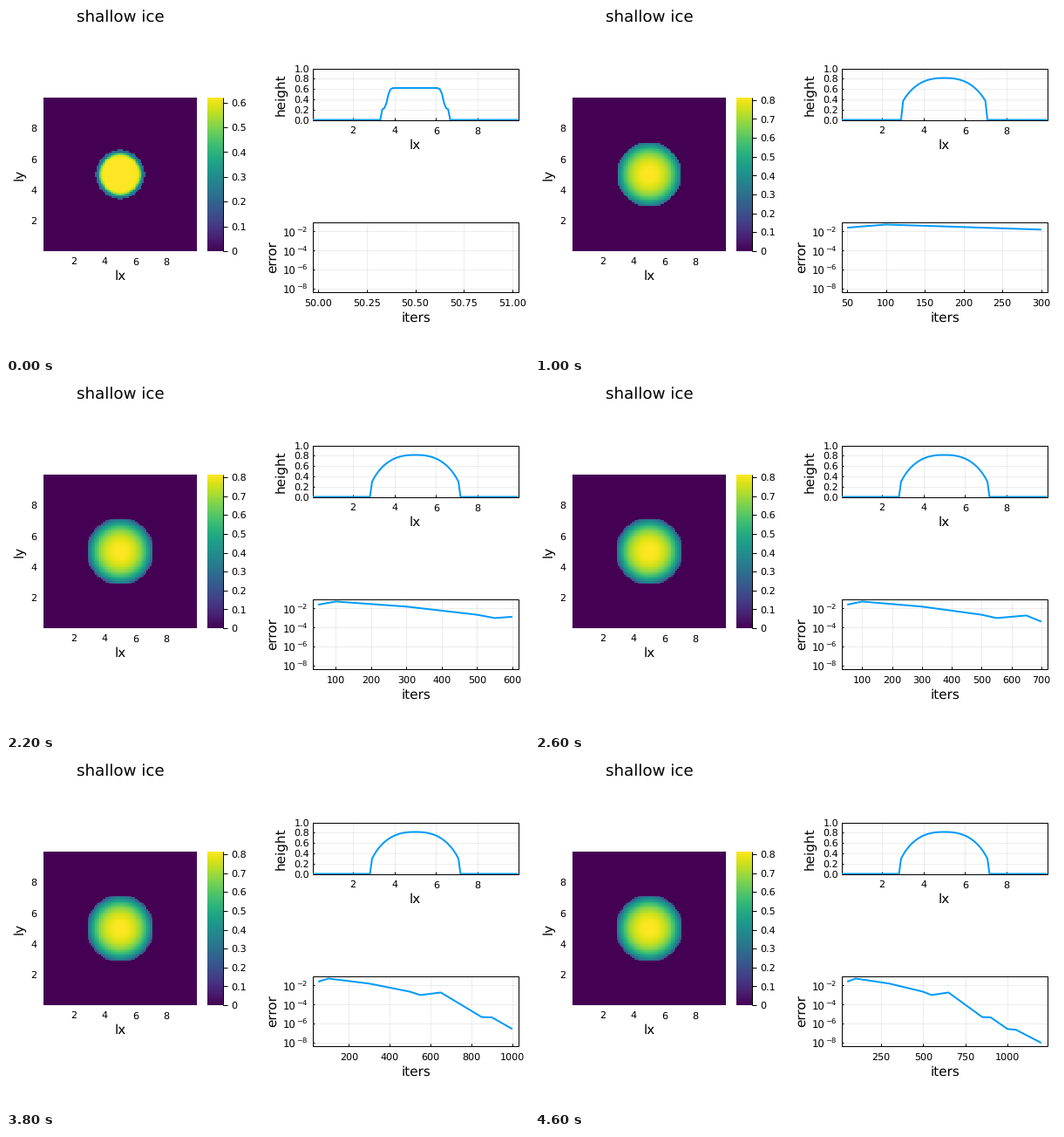
A matplotlib script for the animation above (4800 ms loop, 600x400 px).

```python
import math

import matplotlib.pyplot as plt
import numpy as np
from matplotlib.animation import FuncAnimation
from matplotlib.patches import Rectangle

W, H, DPI = 600, 400, 100
FRAMES, INTERVAL = 24, 200
PX = 72 / DPI
BLUE = "#009afa"
plt.rcParams["font.family"] = "DejaVu Sans"
plt.rcParams["text.hinting"] = "none"

# Panels as left, top, right, bottom in pixels
MAP = (43, 105, 219, 281)
BAR = (231, 105, 249, 281)
PROFILE = (351.5, 71.5, 587.5, 130.5)
ERROR = (351.5, 247.5, 587.5, 327.5)
LOG_MIN, LOG_MAX = math.log10(5e-9), -1.0

# Grid of cells on a 10 x 10 domain
CELLS = 101
DX = 10 / CELLS
XC = (np.arange(CELLS) + 0.5) * DX
COLS, ROWS = np.meshgrid(*[np.arange(CELLS) - CELLS // 2] * 2)
DIST = np.hypot(COLS, ROWS)
REACH = np.maximum(abs(COLS), abs(ROWS))

# Bends of the convergence curve: iteration, log10 of the error
BENDS = np.array([(50, -1.6), (100, -1.27), (300, -1.8), (500, -2.65),
                  (550, -3.0), (650, -2.73), (850, -5.3), (900, -5.33),
                  (1000, -6.55), (1050, -6.63), (1200, -8.0)])

fig = plt.figure(figsize=(W / DPI, H / DPI), dpi=DPI, facecolor="white")
ax = fig.add_axes((0, 0, 1, 1))


def scale(v, lo, hi, a, b):
    return a + (v - lo) / (hi - lo) * (b - a)


def text(x, y, s, px=11.1, ha="center"):
    return ax.text(x, y, s, fontsize=px * PX, ha=ha, va="baseline", zorder=5)


def side_text(x, y, s):
    """Vertical label with its right edge at x, centred on y."""
    ax.text(x, y, s, fontsize=15.2 * PX, rotation=90, ha="right",
            va="center", zorder=5)


def line(xs, ys, color="black", px=1.0, **kw):
    return ax.plot(xs, ys, color=color, lw=px * PX,
                   solid_capstyle="butt", **kw)[0]


def x_tick(box, x, label):
    left, top, right, bottom = box
    return [line((x, x), (top, bottom), px=0.7, alpha=0.1, zorder=1),
            line((x, x), (bottom - 2.5, bottom), zorder=3),
            text(x, bottom + 16, label)]


def y_tick(box, y):
    left, top, right, bottom = box
    line((left, right), (y, y), px=0.7, alpha=0.1, zorder=1)
    line((left, left + 2.5), (y, y), zorder=3)


def framed_curve(box):
    """Black frame with an empty curve clipped to it."""
    left, top, right, bottom = box
    patch = ax.add_patch(Rectangle((left, top), right - left, bottom - top,
                                   fill=False, ec="black", lw=PX, zorder=3))
    item = line([], [], BLUE, 2, zorder=4, solid_joinstyle="round")
    item.set_clip_path(patch)
    return item


def image(data, box):
    left, top, right, bottom = box
    return ax.imshow(data, extent=(left, right, bottom, top), cmap="viridis",
                     aspect="auto", interpolation="nearest", zorder=2)


def nice_ticks(lo, hi):
    """Tick positions that balance count, coverage and roundness."""
    best, pick = -1, None
    for q, nice in ((1, 1), (5, .9), (2.5, .5), (2, .7), (3, .2)):
        for z in range(-2, 4):
            step = q * 10.0 ** z
            first, last = math.ceil(lo / step), math.floor(hi / step)
            n = last - first + 1
            if not 4 <= n <= 8:
                continue
            score = (.25 * (1 - abs(n - 5) / 5)
                     + .5 * (hi - lo) / ((n - 1) * step) + .25 * nice)
            if score > best + 1e-9:
                best, pick = score, step * np.arange(first, last + 1)
    return pick


def ice_height(k):
    """A steep plug that relaxes into a spreading dome."""
    relaxed = 1 - math.exp(-k)
    r = DIST * DX
    plug = .2 + .42 / (1 + np.exp((r - 1.34) / .055))
    dome = .814 * np.maximum(0, 1 - (r / 2.3) ** 2.5) ** .68
    h = (1 - relaxed) * plug + relaxed * dome
    n = round(21 - 5 * math.exp(-k / 3))
    inside = (REACH <= n) & (DIST <= n + .05 + 1.15 * relaxed)
    return np.where(inside, h, 0)


# Map and colour bar
text(131, 18, "shallow ice", 18.3)
text(131, 314.5, "lx", 15.2)
side_text(23, 193, "ly")
for v in (2, 4, 6, 8):
    text(scale(v, 0, 10, MAP[0], MAP[2]), 296.5, str(v))
    text(35.5, scale(v, 0, 10, MAP[3], MAP[1]) + 4, str(v), ha="right")
heat = image(np.zeros((CELLS, CELLS)), MAP)
image(np.linspace(1, 0, 256)[:, None], BAR)
line((BAR[2], BAR[2]), (BAR[1], BAR[3]), zorder=3)

# Height profile
for v in (2, 4, 6, 8):
    x_tick(PROFILE, scale(v, XC[0], XC[-1], PROFILE[0], PROFILE[2]), str(v))
for i in range(6):
    y = scale(i, 0, 5, PROFILE[3], PROFILE[1])
    y_tick(PROFILE, y)
    text(348, y + 4, f"{i / 5:.1f}", ha="right")
height = framed_curve(PROFILE)
text(469.5, 164.5, "lx", 15.2)
side_text(322.5, 102, "height")

# Error history
for p in (2, 4, 6, 8):
    y = scale(-p, LOG_MIN, LOG_MAX, ERROR[3], ERROR[1])
    y_tick(ERROR, y)
    text(318, y + 6, "10", 11.6, ha="left")
    text(345.5, y + 1, f"\u2212{p}", 8.4, ha="right")
error = framed_curve(ERROR)
text(470, 361.5, "iters", 15.2)
side_text(313, 288, "error")

ax.set_xlim(0, W)
ax.set_ylim(H, 0)
ax.axis("off")

moving = []


def draw(k):
    while moving:
        moving.pop().remove()

    ice = ice_height(k)
    top = ice.max()
    heat.set_data(ice)
    heat.set_clim(0, top)
    for i in range(int(top * 10) + 1):
        y = scale(i / 10, 0, top, BAR[3], BAR[1])
        moving.append(line((BAR[2], BAR[2] + 5), (y, y), zorder=3))
        moving.append(text(258, y + 4, f"{i / 10:.1f}" if i else "0",
                           ha="left"))

    height.set_data(scale(XC, XC[0], XC[-1], PROFILE[0], PROFILE[2]),
                    scale(ice[CELLS // 2], 0, 1, PROFILE[3], PROFILE[1]))

    iters = 50 * np.arange(1, k + 2)
    first, last = 50, max(51, iters[-1])
    pad = 0.03 * (last - first)
    lo, hi = first - pad, last + pad
    error.set_data(scale(iters, lo, hi, ERROR[0], ERROR[2]),
                   scale(np.interp(iters, *BENDS.T), LOG_MIN, LOG_MAX,
                         ERROR[3], ERROR[1]))
    digits = 2 if hi - lo < 4 else 0
    for v in nice_ticks(lo, hi):
        x = scale(v, lo, hi, ERROR[0], ERROR[2])
        moving.extend(x_tick(ERROR, x, f"{v:.{digits}f}"))
    return [heat, height, error, *moving]


anim = FuncAnimation(fig, draw, frames=FRAMES, interval=INTERVAL,
                     repeat=True, repeat_delay=0, blit=False)
plt.show()
```
